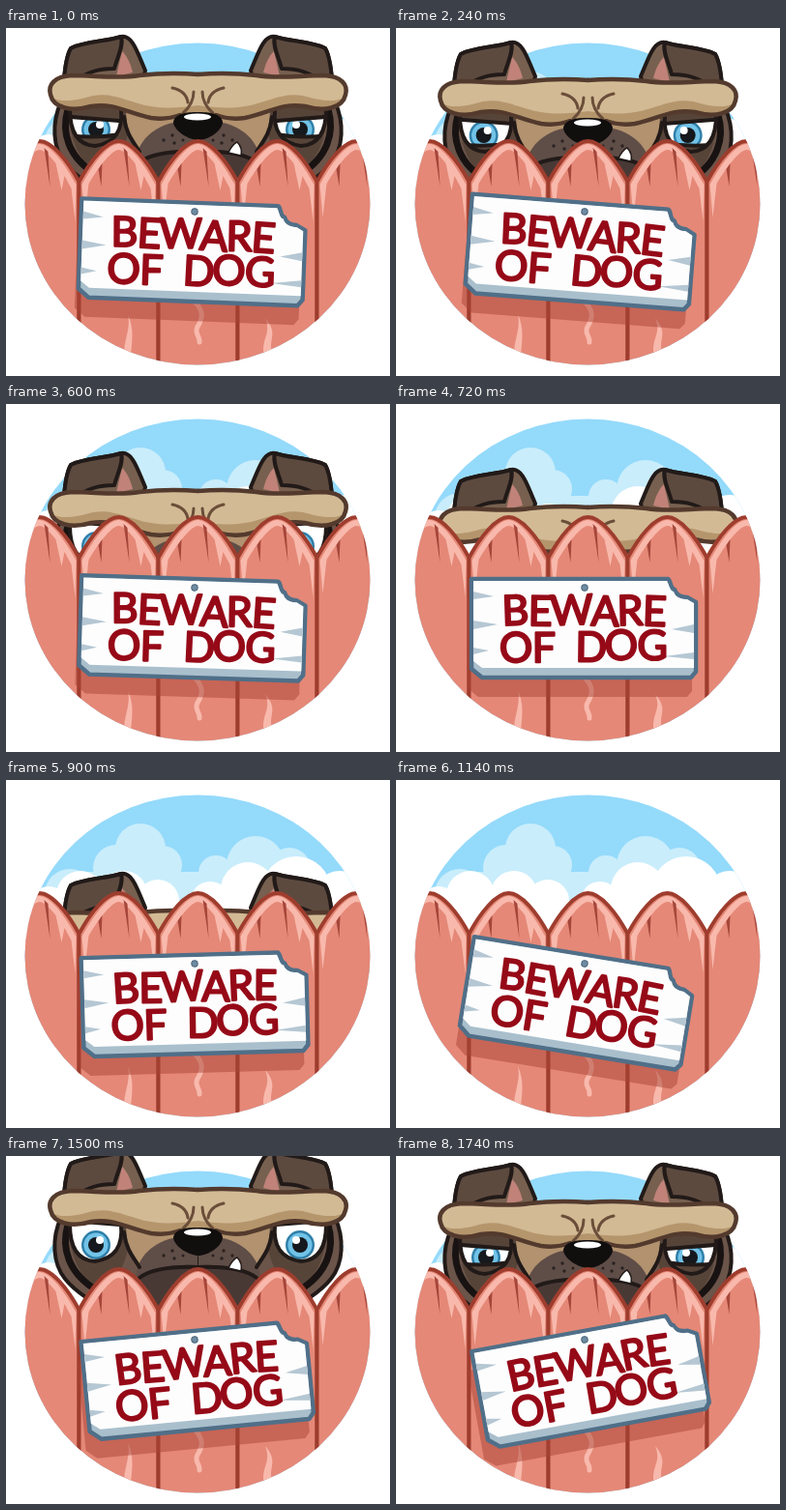
Animation, 397 px wide and 360 px high, one loop 1800 ms. Source, as an HTML page:

```html
<!DOCTYPE html>
<html lang="en">
<head>
<meta charset="utf-8">
<title>Beware of dog</title>
<style>
  html, body { margin: 0; width: 100%; height: 100%; overflow: hidden; background: #fff; }
  svg { display: block; }
  .ink { stroke: #211a18; stroke-width: 4; stroke-linejoin: round; stroke-linecap: round; }
  .line { fill: none; }
  .words {
    font: 400 43px Lato, "Open Sans", sans-serif; letter-spacing: -1.4px;
    fill: #960a18; stroke: #960a18; stroke-width: 2.2; stroke-linejoin: round;
  }
</style>
</head>
<body>
<svg width="397" height="360" viewBox="0 0 397 360">
  <defs>
    <clipPath id="disc"><ellipse cx="198" cy="182" rx="178.5" ry="166.5"/></clipPath>
    <clipPath id="socket"><path d="M66 82H119C121 106 113 119 92 122C75 121 66 108 66 82Z"/></clipPath>
    <path id="board" d="M-117 -9H86C89 -9 88 1 93 2C95 9 101 10 106 10L115 15V87L110 93H-106L-117 84Z"/>

    <g id="ear">
      <path class="ink" fill="#77604f" d="M60 54C61 40 63 28 67 21C80 14 104 14 119 9C131 7 136 26 144 44L140 60H62Z"/>
      <path fill="#c08279" d="M120 24C126 30 129 38 131 46L114 50Z"/>
      <path class="ink" stroke-width="3" fill="#5d4a3f" d="M60 54C61 40 63 28 67 21C80 14 104 14 119 9C122 18 115 30 112 42C96 42 84 45 74 54Z"/>
    </g>

    <g id="cheek">
      <path class="ink" fill="#6b5449" d="M57 76C47 98 48 124 61 140C72 154 90 166 120 180H198V60H90Z"/>
      <path fill="#574439" d="M66 80H128C130 116 116 146 96 150C74 140 64 110 66 80Z"/>
      <path class="line" stroke="#181312" stroke-width="7" d="M64 84C57 108 64 134 94 152"/>
    </g>

    <g id="muzzle">
      <path fill="#b2926f" d="M124 82H198V140H150C134 130 124 112 124 82Z"/>
      <path fill="#5f4d47" d="M198 96C168 94 144 106 136 128L126 180H198Z"/>
      <path class="ink line" stroke-width="3" d="M122 92C124 110 132 118 138 128"/>
      <path fill="#483935" d="M198 126C172 125 148 130 140 138L132 180H198Z"/>
      <path class="ink line" d="M138 139C150 130 172 127 198 128"/>
      <g fill="#2b2220">
        <circle cx="163" cy="116" r="1.7"/><circle cx="172" cy="111" r="1.7"/>
        <circle cx="174" cy="119" r="1.7"/><circle cx="183" cy="116" r="1.5"/>
      </g>
    </g>

    <g id="browHalf" stroke-linecap="round" stroke-linejoin="round">
      <path fill="#d2ba95" d="M199 48C175 46 155 47 138 49C116 53 92 49 68 49C50 50 43 59 46 69C49 83 68 87 88 81C112 77 125 88 150 93C168 95 180 90 199 88Z"/>
      <path fill="#b5966c" d="M47 71C51 84 68 87 88 81C112 77 125 88 150 93C168 95 180 90 199 88V80C182 82 168 84 150 81C126 77 112 66 90 70C72 75 56 78 47 71Z"/>
      <path fill="none" stroke="#533a2d" stroke-width="4.5" d="M199 48C175 46 155 47 138 49C116 53 92 49 68 49C50 50 43 59 46 69C49 83 68 87 88 81C112 77 125 88 150 93C164 95 172 93 180 90"/>
      <path fill="none" stroke="#6b4e39" stroke-width="3" d="M172 62C181 64 187 69 188 77M183 88C190 82 194 76 194 66"/>
    </g>

    <g id="picket">
      <path fill="#e58877" stroke="#9e3d2e" stroke-width="4" stroke-linejoin="round" d="M-41 400V159C-29 137 -13 117 0 117C13 117 29 137 41 159V400Z"/>
      <path fill="#f8b9ac" d="M-38 162C-26 140 -11 120 0 120C11 120 26 140 38 162L37 200L33 166L26 153L23 168L17 140C9 130 4 126 0 126C-8 127 -20 143 -31 161L-35 196Z"/>
      <path fill="#a5463a" d="M5 124L9 128L11 164ZM-21 146L-17 140L-18 164Z"/>
    </g>
  </defs>

  <g clip-path="url(#disc)">
    <path fill="#94dafb" d="M0 0H397V360H0Z"/>
    <g fill="#c9edfb">
      <circle cx="139" cy="71" r="26"/><circle cx="114" cy="91" r="24"/><circle cx="162" cy="88" r="20"/>
      <circle cx="258" cy="88" r="30"/><circle cx="217" cy="96" r="18"/><circle cx="293" cy="92" r="22"/>
      <circle cx="66" cy="118" r="26"/><path d="M60 95H300V170H60Z"/>
    </g>
    <g fill="#fff">
      <circle cx="77" cy="119" r="25"/><circle cx="122" cy="118" r="24"/><circle cx="157" cy="125" r="22"/>
      <circle cx="44" cy="130" r="20"/><circle cx="211" cy="125" r="20"/><circle cx="250" cy="113" r="28"/>
      <circle cx="300" cy="115" r="36"/><circle cx="345" cy="122" r="28"/><path d="M20 130H377V190H20Z"/>
    </g>
  </g>

  <g id="dog">
    <g class="pair" data-part="ear"></g>
    <g class="pair" data-part="cheek"></g>
    <g class="pair" data-part="muzzle"></g>
    <g id="eyes"></g>
    <g class="pair" data-part="browHalf"></g>
    <path fill="#fff" stroke="#211a18" stroke-width="1.5" d="M230 129C232 124 236 119 239 118C243 122 244 127 243 132Z"/>
    <path fill="#110e0e" d="M173 97C175 88 187 87 198 87C210 87 222 88 224 97C224 106 209 116 199 116C189 116 173 106 173 97Z"/>
    <ellipse cx="198" cy="92" rx="14" ry="3.5" fill="#fff"/>
  </g>

  <g clip-path="url(#disc)">
    <g id="fence"></g>
    <path fill="none" stroke="#f8b9ac" stroke-width="5" stroke-linecap="round" d="M196 284C205 294 203 301 198 309C194 316 201 319 200 325"/>
    <path fill="#f8b9ac" d="M266 335C266 318 274 316 268 300C282 316 271 322 275 335ZM122 335C123 320 129 310 126 296C133 312 130 324 129 340Z"/>
    <use id="shadow" href="#board" fill="#a94537" fill-opacity=".5"/>
  </g>

  <g id="sign">
    <use href="#board" fill="#a9bfcc" stroke="#506f88" stroke-width="4.5" stroke-linejoin="round"/>
    <path fill="#fdfdfd" d="M-115 -7H85C88 -2 88 4 92 4C94 11 101 12 106 12L113 16V83H-106L-115 76Z"/>
    <path fill="#b5c7d3" d="M-115 4L-94 9L-115 12ZM-115 34L-90 38L-115 43ZM-115 62L-99 65L-115 69ZM113 38L90 43L113 47ZM113 67L82 71L113 74Z"/>
    <circle r="3.2" fill="#6f8ba0" stroke="#46627a" stroke-width="1"/>
    <text class="words" x="-85" y="39" rotate="-2 1 -2 2 -1 2">BEWARE</text>
    <text class="words" x="-89" y="76" rotate="-2 1 0 2 -2 1" word-spacing="13" transform="rotate(-1.2)">OF DOG</text>
  </g>
</svg>

<script>
const $ = id => document.getElementById(id);
const LOOP = 1800, STEP = 60;

// Rows of [time, value]
const dogY = [[0, 0], [240, 6], [420, 21], [600, 42], [900, 88], [1140, 140], [1200, 146],
              [1320, 62], [1440, -9], [1500, -13], [1560, -13], [1680, -3], [1740, 0], [1800, 0]];
const swing = [[0, 2.2], [240, 4.5], [420, 5.5], [600, 1.8], [900, -1.6], [1140, 9.3], [1500, -5.5], [1740, -10.4], [1800, 2.2]];
const squint = [[0, 1], [180, 1], [360, 0], [1320, 0], [1560, 0], [1680, 1], [1800, 1]];
const gaze = [[0, 0], [180, 0], [360, -9], [480, -9], [600, 0], [1800, 0]];

// Cubic easing through the rows, with slopes taken from the neighbours
function at(rows, t) {
  let i = 0;
  while (i < rows.length - 2 && t >= rows[i + 1][0]) i++;
  const slope = k => {
    const a = rows[Math.max(k - 1, 0)], b = rows[k], c = rows[Math.min(k + 1, rows.length - 1)];
    if ((b[1] - a[1]) * (c[1] - b[1]) <= 0) return 0;
    return (c[1] - a[1]) / (c[0] - a[0]);
  };
  const [t0, v0] = rows[i], [t1, v1] = rows[i + 1], d = t1 - t0, u = (t - t0) / d;
  const e = u * u * (3 - 2 * u), w = u * (1 - u);
  return v0 + (v1 - v0) * e + d * w * ((1 - u) * slope(i) - u * slope(i + 1));
}

const mirror = 'transform="translate(397) scale(-1 1)"';
for (const g of document.querySelectorAll('.pair')) {
  const use = `<use href="#${g.dataset.part}"`;
  g.innerHTML = `${use}/>${use} ${mirror}/>`;
}

const eye = `<g clip-path="url(#socket)">
  <path fill="#fff" d="M60 80H125V130H60Z"/>
  <g class="iris">
    <circle cx="93" cy="105" r="15" fill="#2f7fa8"/><circle cx="93" cy="105" r="12.5" fill="#72c3e8"/>
    <circle cx="93" cy="105" r="8" fill="#15191d"/><circle cx="97" cy="100" r="4" fill="#fff"/>
  </g>
  <path class="upper ink" stroke-width="3" fill="#574439" d="M55 -40H130V3L55 -3Z"/>
  <path class="lower ink" stroke-width="3" fill="#574439" d="M55 -2Q92 4 130 -4V40H55Z"/>
</g>
<path class="ink line" stroke-width="3" d="M66 84C66 108 75 121 92 122C113 119 121 106 119 84"/>`;
$('eyes').innerHTML = `<g>${eye}</g><g ${mirror}>${eye}</g>`;

$('fence').innerHTML = [0, 1, 2, 3, 4]
  .map(i => `<use href="#picket" x="${34.5 + 82 * i}"/>`).join('');

const each = (selector, move) => document.querySelectorAll(selector).forEach((el, i) => place(el, move(i)));
const place = (el, value) => el.setAttribute('transform', value);

function draw() {
  const t = Math.floor(performance.now() % LOOP / STEP) * STEP;
  const angle = at(swing, t), look = at(gaze, t), shut = at(squint, t);
  place($('dog'), `translate(0 ${at(dogY, t)})`);
  place($('sign'), `translate(195 190) rotate(${angle})`);
  place($('shadow'), `translate(191 210) rotate(${angle})`);
  each('.iris', i => `translate(${i ? -look : look})`);
  each('.upper', () => `translate(0 ${82 + 12 * shut})`);
  each('.lower', () => `translate(0 ${124 - 12 * shut})`);
  requestAnimationFrame(draw);
}
draw();
</script>
</body>
</html>
```
